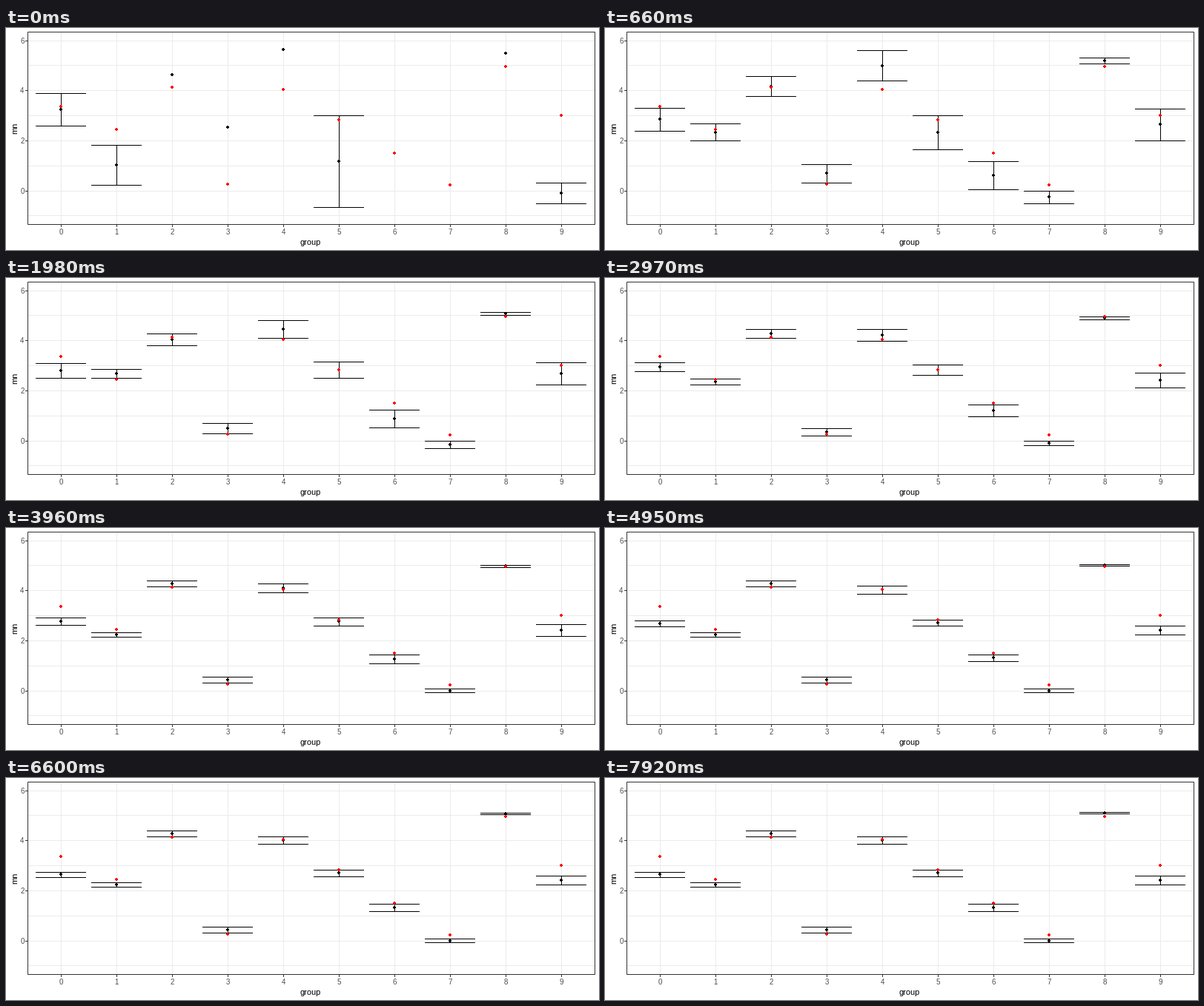
These frames come from a looping animation (800x300 px, 8000 ms). A matplotlib script:

```python
import numpy as np
import matplotlib.pyplot as plt
from matplotlib.animation import FuncAnimation
from matplotlib.patches import Rectangle

W, H, DPI = 800, 300, 100
PX = 72 / DPI            # one pixel in points
STEP, TICK, LOOP = 330, 20, 8000
FONT = "Liberation Sans"
GROUPS = np.arange(10)
XS = 74 + 75 * GROUPS
ZERO, UNIT = 220, 33.83  # pixel row of value 0, pixels per unit

TRUTH = [106, 137, 80, 211, 83, 124, 169, 212, 52, 118]
# Estimated mean at steps 0, 4, 6, 9 and when the group settles
MEANS = [
    (110, 126, 125, 120, 130.4),
    (185, 132, 129, 140, 144),
    (63, 82, 83, 75, 75),
    (134, 209, 203, 208, 205),
    (29, 55, 69, 77, 84),
    (180, 133, 124, 124, 128.4),
    (205, 198, 190, 179, 175),
    (235, 227, 225, 223, 219.6),
    (34, 46, 48, 54, 47),
    (223, 112, 129, 138, 138),
]
# Half height of the bar at step 4; it then shrinks by a power law
SPREAD = np.array([14, 8.5, 12, 11, 18, 15.5, 17, 7.5, 3.5, 22.5])
SETTLED = np.array([16, 12, 12, 12, 16, 16, 16, 12, 24, 16])
FIRST_BARS = {0: 22.5, 1: 27.5, 5: 62, 9: 14}
UNSEEN = [6, 7]


def settle(step, steps, values):
    """Interpolate over 1/n, as running averages do."""
    return np.interp(-1 / (step + 1), -1 / (np.array(steps) + 1), values)


def estimate(g, step):
    """Mean and half height of one group's bar."""
    if step == 0 and g in UNSEEN:
        return np.nan, np.nan
    n = min(step, SETTLED[g])
    mean = settle(n, [0, 4, 6, 9, SETTLED[g]], MEANS[g])
    if step == 0:
        return mean, FIRST_BARS.get(g, np.nan)
    if n < 4:
        first = FIRST_BARS.get(g, 1.8 * SPREAD[g])
        return mean, settle(n, [0, 4], [first, SPREAD[g]])
    return mean, SPREAD[g] * (n / 4) ** -0.95


fig = plt.figure(figsize=(W / DPI, H / DPI), dpi=DPI, facecolor="white")
ax = fig.add_axes([0, 0, 1, 1])
ax.set(xlim=(0, W), ylim=(H, 0))
ax.axis("off")

# A four pixel disc without its corners
DISC = [(-2, -1), (-2, 1), (-1, 1), (-1, 2), (1, 2), (1, 1),
        (2, 1), (2, -1), (1, -1), (1, -2), (-1, -2), (-1, -1)]


def line(xs, ys, color, z):
    return ax.plot(xs, ys, color=color, lw=PX, snap=True, zorder=z,
                   solid_capstyle="projecting")[0]


def dots(ys, color, z):
    return ax.plot(XS, ys, ls="none", marker=DISC, color=color, ms=4 * PX,
                   mew=0, zorder=z)[0]


def label(x, y, s, size, color, ha="center", **kw):
    ax.text(x, y, s, fontsize=size * PX, color=color, family=FONT, ha=ha, **kw)


# Panel, grid, ticks and labels
for v in range(-1, 7):
    y = int(ZERO - UNIT * v)
    line([30, 793], [y, y], "#ebebeb", 1)
    if v % 2 == 0:
        line([26, 28], [y, y], "#333333", 2)
        label(24.5, y + 4, str(v), 9.8, "#4d4d4d", ha="right")
for g, x in enumerate(XS):
    line([x, x], [6, 264], "#ebebeb", 1)
    line([x, x], [266, 268], "#333333", 2)
    label(x, 279, str(g), 9.8, "#4d4d4d")
ax.add_patch(Rectangle((29, 5), 765, 260, fill=False, ec="#333333", lw=PX,
                       snap=True, zorder=6))
label(411, 293, "group", 11, "black")
label(12, 135.5, "mn", 11, "black", va="center", rotation=90)

bars = line([], [], "black", 3)
means = dots(np.full(10, np.nan), "black", 4)
dots(TRUTH, "red", 5)


def draw(i):
    step = int((i + 0.5) * TICK // STEP)
    mean, half = np.array([estimate(g, step) for g in GROUPS]).T
    top, bottom = np.round(mean - half), np.round(mean + half)
    gap = np.nan
    bx, by = [], []
    for x, t, b in zip(XS, top, bottom):
        bx += [x - 34, x + 33, gap, x, x, gap, x - 34, x + 33, gap]
        by += [t, t, gap, t, b, gap, b, b, gap]
    bars.set_data(bx, by)
    means.set_ydata(np.round(mean))
    return bars, means


anim = FuncAnimation(fig, draw, frames=LOOP // TICK, interval=TICK,
                     repeat=True, repeat_delay=0)
plt.show()
```
